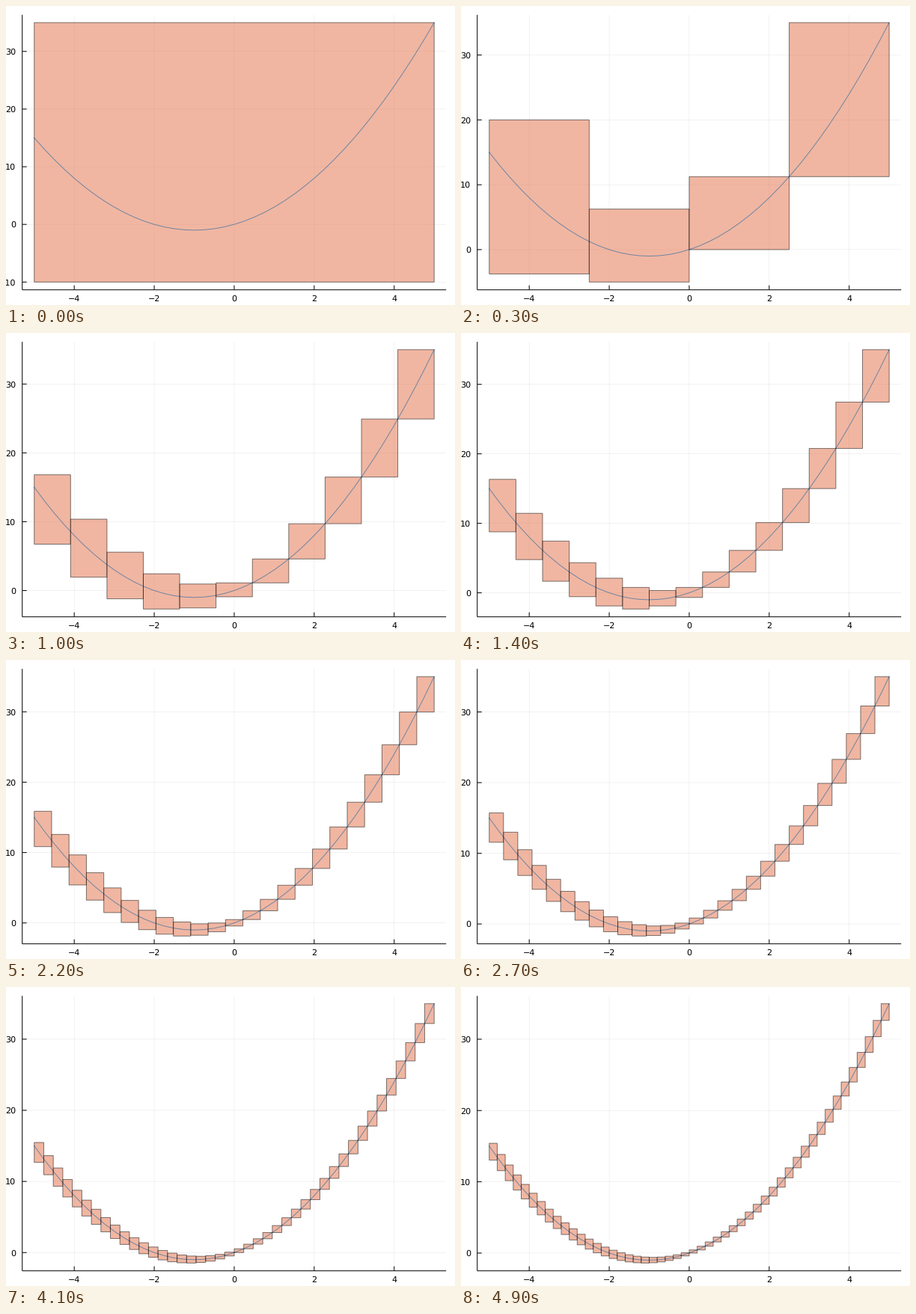
These frames come from a looping animation (600x400 px, 5 s). A matplotlib script:

```python
import matplotlib.pyplot as plt
import numpy as np
from matplotlib.animation import FuncAnimation
from matplotlib.patches import Rectangle
from matplotlib.ticker import MultipleLocator

WIDTH, HEIGHT, DPI = 600, 400, 100
LEFT, RIGHT, TOP, BOTTOM = 21.7, 588.2, 11.8, 379.7
PX = 72 / DPI  # points per pixel
TICK_LENGTH = 6
X_MIN, X_MAX = -5, 5
PADDING = 0.03
BLUE = (0, 0.6056, 0.9787)
ORANGE = (0.8889, 0.4356, 0.2781)

plt.rcParams["font.family"] = "DejaVu Sans"
plt.rcParams["text.hinting"] = "none"


def padded(low, high):
    margin = PADDING * (high - low)
    return low - margin, high + margin


def enclosure(a, b):
    """Interval evaluation of x**2 + 2*x over [a, b]."""
    square_low = 0 if a <= 0 <= b else min(a * a, b * b)
    square_high = max(a * a, b * b)
    return square_low + 2 * a, square_high + 2 * b


fig = plt.figure(figsize=(WIDTH / DPI, HEIGHT / DPI), dpi=DPI, facecolor="white")
ax = fig.add_axes([LEFT / WIDTH, 1 - BOTTOM / HEIGHT,
                   (RIGHT - LEFT) / WIDTH, (BOTTOM - TOP) / HEIGHT])
ax.set_axisbelow(True)
ax.spines[["top", "right"]].set_visible(False)
for side in ("left", "bottom"):
    ax.spines[side].set(linewidth=PX, snap=False, capstyle="butt")
ax.tick_params(length=0, labelsize=8)
ax.tick_params(axis="x", pad=7.2 * PX)
ax.tick_params(axis="y", pad=8.7 * PX)
ax.xaxis.set_major_locator(MultipleLocator(2))
ax.yaxis.set_major_locator(MultipleLocator(10))
ax.grid(color="black", alpha=0.1, linewidth=0.5 * PX, snap=False)

# Inward ticks as plain lines, so they keep their sub-pixel positions.
tick_style = dict(colors="black", linewidths=PX, snap=False)
ax.vlines(range(-4, 5, 2), 0, TICK_LENGTH / (BOTTOM - TOP),
          transform=ax.get_xaxis_transform(), **tick_style)
ax.hlines(range(-10, 31, 10), 0, TICK_LENGTH / (RIGHT - LEFT),
          transform=ax.get_yaxis_transform(), **tick_style)

x = np.linspace(X_MIN, X_MAX, 41)
ax.plot(x, x**2 + 2 * x, color=BLUE, linewidth=PX, snap=False, zorder=2)
ax.set_xlim(*padded(X_MIN, X_MAX))


def update(frame):
    for old_box in list(ax.patches):
        old_box.remove()
    edges = np.linspace(X_MIN, X_MAX, frame + 2)
    ranges = [enclosure(a, b) for a, b in zip(edges[:-1], edges[1:])]
    for a, b, (low, high) in zip(edges[:-1], edges[1:], ranges):
        ax.add_patch(Rectangle((a, low), b - a, high - low, facecolor=(*ORANGE, 0.5),
                               edgecolor=(0, 0, 0, 0.5), linewidth=PX,
                               snap=False, zorder=2.2))
    ax.set_ylim(*padded(np.min(ranges), np.max(ranges)))
    return ax.patches


anim = FuncAnimation(fig, update, frames=50, interval=100, repeat=True, repeat_delay=0)
plt.show()
```
